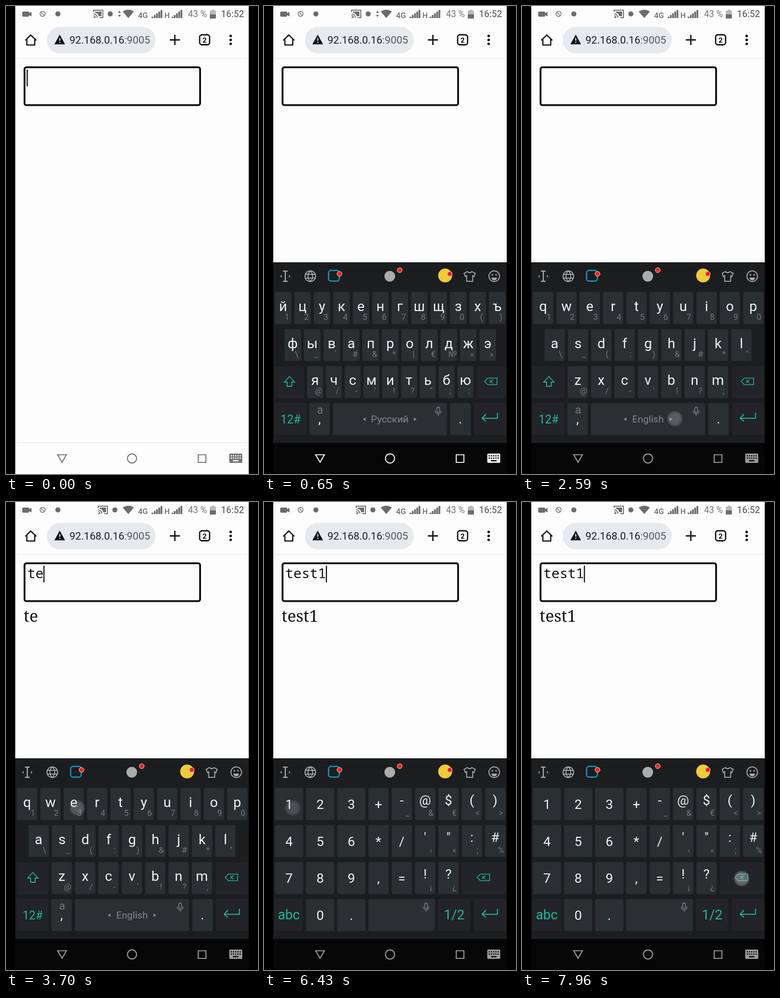
These frames come from a looping animation (544x1008 px, 8000 ms). An HTML page with a canvas:

```html
<!DOCTYPE html>
<html lang="en">
<head>
<meta charset="utf-8">
<title>Typing on a phone</title>
<style>
html, body { margin: 0; width: 100%; height: 100%; overflow: hidden; background: #000; }
canvas { display: block; }
</style>
</head>
<body>
<canvas id="stage" width="544" height="1008"></canvas>
<script>
const g = document.getElementById('stage').getContext('2d');
const LOOP = 8000, TAU = Math.PI * 2;
const SANS = 'Roboto, sans-serif';
const PAGE = '#fdfdfd', INK = '#111112', PILL = '#e6e9ed', STATUS = '#6c6c6c';
const BOARD = '#1c1d1f', KEY = '#2a2f32', SIDE = '#222427', NAV = '#060607';
const TEAL = '#22b79d', PALE = '#f2f2f2', DIM = '#74767a', ICON = '#a9abad', LABEL = '#85888b', RED = '#f02018';

// what the input holds, and when the caret restarts
const TYPED = [[3140, 't'], [3555, 'te'], [4290, 'tes'], [4440, 'test'], [6340, 'test1']];
const CARET = [-60, 3140, 3555, 4290, 4440, 6340, 6470, 7470];
// x, y, press, release, end x
const TOUCHES = [
  [201, 889, 1930, 2470, 330], [253, 657, 3090, 3150], [154, 659, 3510, 3570], [125, 738, 4250, 4300],
  [252, 657, 4390, 4450], [58, 890, 5500, 5580], [62, 659, 6190, 6270], [474, 811, 7800, 7900]
];
const RISE = 40, RISE_TIME = 310, SETTLE = 860, SWIPE = 2130, TO_ENGLISH = 2420, TO_NUMBERS = 5600;
const FADE = 260;

const clamp = v => Math.max(0, Math.min(1, v));
const at = (list, t) => list.filter(e => e <= t).pop();

function text(s, x, y, size, color, align = 'center', font = SANS, weight = 400) {
  g.font = `${weight} ${size}px ${font}`;
  g.textAlign = align;
  g.fillStyle = color;
  g.fillText(s, x, y);
}
function rect(x, y, w, h, color) {
  g.fillStyle = color;
  g.fillRect(x, y, w, h);
}
function paint(fill, stroke, lw) {
  if (fill) { g.fillStyle = fill; g.fill(); }
  if (stroke) { g.strokeStyle = stroke; g.lineWidth = lw; g.stroke(); }
}
function box(x, y, w, h, r, fill, stroke, lw = 2) {
  g.beginPath();
  g.roundRect(x, y, w, h, r);
  paint(fill, stroke, lw);
}
function disc(x, y, r, fill, stroke, lw = 2) {
  g.beginPath();
  g.arc(x, y, r, 0, TAU);
  paint(fill, stroke, lw);
}
// SVG path data placed at x, y
function path(d, x, y, fill, stroke, lw = 2) {
  g.save();
  g.translate(x, y);
  const p = new Path2D(d);
  if (fill) { g.fillStyle = fill; g.fill(p); }
  if (stroke) { g.strokeStyle = stroke; g.lineWidth = lw; g.stroke(p); }
  g.restore();
}

function signal(x) {
  for (let i = 0; i < 5; i++) {
    const h = 3 + i * 3.6;
    rect(x + i * 4.8, 26 - h, 3.8, h, STATUS);
  }
}

function statusBar(t) {
  const early = t < SETTLE, dx = early ? 0 : 10;
  box(35, 12, 15, 11, 2, STATUS);
  path('M0 -2L5 -5V5L0 2Z', 50, 17.5, STATUS);
  disc(79, 17, 5.5, null, STATUS, 1.5);
  path('M-3 -3L3 3', 79, 17, null, STATUS, 1.5);
  disc(112, 17, 5.5, STATUS);
  path('M-10 -4V-8H10V8H3M-10 8H-7M-10 4A4 4 0 0 1 -6 8M-10 0A8 8 0 0 1 -2 8', 199 + dx, 17, null, STATUS, 2);
  path('M-7 -5H7V5H1A10 10 0 0 0 -7 -3Z', 199 + dx, 17, STATUS);
  disc(225 + dx, 17, 5.5, STATUS);
  if (early) path('M-3 -2L0 -7L3 -2ZM-3 2L0 7L3 2Z', 245, 17, STATUS);
  path('M0 9L-12 -5Q0 -13 12 -5Z', 264, 17, STATUS);
  text('4G', 285, 26, 17, STATUS, 'left', SANS, 500);
  signal(314.5);
  text('H', 342, 26, 16, STATUS, 'left', SANS, 500);
  signal(357.5);
  text('43 %', 393, 24, 19.3, '#757575', 'left');
  rect(444, 8, 6, 3, '#b9b9b9');
  rect(440, 10, 13, 8, '#b9b9b9');
  rect(440, 18, 13, 9, STATUS);
  text('16:52', 464, 24, 19.7, STATUS, 'left', SANS, 500);
}

function browserBar() {
  path('M-12 1L0 -10.5L12 1M-8.5 -2V11H8.5V-2', 53.5, 73, null, INK, 2.6);
  box(88, 45, 235, 57, 28.5, PILL);
  path('M0 -11L11.5 10H-11.5Z', 116, 72.5, INK);
  rect(115, 69, 2.2, 6, PILL);
  rect(115, 77, 2.2, 2.4, PILL);
  text('92.168.0.16', 137, 81, 22.4, '#1d1e20', 'left');
  const w = g.measureText('92.168.0.16').width;
  text(':9005', 137 + w, 81, 22.4, '#585a5e', 'left');
  path('M-11 0H11M0 -11V11', 364.5, 73, null, INK, 2.8);
  box(418, 62, 21.5, 21.5, 5, null, INK, 2.8);
  text('2', 428.8, 78.5, 15.5, INK, 'center', SANS, 700);
  for (const y of [64.5, 73, 81.5]) disc(485, y, 2.8, INK);
  rect(20, 112, 504, 1.5, '#ebebeb');
}

function page(t) {
  const entry = TYPED.filter(e => e[0] <= t).pop();
  const value = entry ? entry[1] : '';
  box(40, 132, 379, 81.5, 4, null, INK, 4);
  text(value, 46, 164, 29.35, INK, 'left', '"Noto Sans Mono", monospace');
  const x = value ? 45.5 + g.measureText(value).width : 44.5;
  if ((t - at(CARET, t)) % 1000 < 500) rect(x, 137, 2.4, 36, INK);
  text(value, 38, 258, 35.2, INK, 'left', '"Noto Serif", serif');
}

function toolbar() {
  path('M-5 -11H5M-5 11H5M0 -11V11', 46, 582, null, ICON, 2.4);
  path('M-11 0L-8 -3V3ZM11 0L8 -3V3Z', 46, 582, ICON);
  disc(100, 582, 11.5, null, ICON);
  path('M-11 -4H11M-11 4H11M0 -11C-7 -5 -7 5 0 11C7 5 7 -5 0 -11', 100, 582, null, ICON, 1.8);
  box(139.5, 569.5, 23, 23, 5, null, '#1b86ae', 3);
  disc(271.5, 582, 11.5, ICON);
  disc(391, 580.5, 15, '#f0cb38');
  for (const [x, y] of [[163, 577], [293, 569], [401, 577]]) disc(x, y, 5.2, RED, '#e8c0b8', 1.2);
  path('M-5 -10Q0 -5 5 -10L12 -6L9 1L6.5 -1V11H-6.5V-1L-9 1L-12 -6Z', 444, 582, null, ICON);
  disc(497, 582, 11.5, null, ICON);
  disc(493, 579, 1.8, ICON);
  disc(501, 579, 1.8, ICON);
  path('M-6 3H6A6 6 0 0 1 -6 3Z', 497, 582, ICON);
}

const rowY = r => 616 + r * 79.7;

function key(x, r, w, label, hint, size = 30, dy = 41) {
  box(x, rowY(r), w, 69, 4, KEY);
  if (label) text(label, x + w / 2, rowY(r) + dy, size, PALE);
  if (hint) text(hint, x + w - 9.5, rowY(r) + 60, 18, DIM);
}
function side(x, r, w, label, size = 25) {
  box(x, rowY(r), w, 69, 4, SIDE);
  if (label) text(label, x + w / 2, rowY(r) + 44, size, TEAL);
}
function row(x, r, pitch, w, labels, hints) {
  [...labels].forEach((c, i) => key(x + i * pitch, r, w, c, hints[i]));
}
function shiftKey(w, x) {
  side(23, 2, w);
  path('M0 -11L11 1H5V10H-5V1H-11Z', x, 809, null, TEAL, 1.8);
}
function backspace(x, w, cx) {
  side(x, 2, w);
  path('M-14 0L-7 -7H13V7H-7ZM-3 -3L4 4M4 -4L-3 3', cx, 808.5, null, TEAL, 1.6);
}
function enter() {
  side(453, 3, 69);
  path('M17 -10V2H-16M-8 -7L-16 2L-8 9', 487, 886, null, TEAL, 2);
}
function mic(x) {
  box(x - 3, 864, 6, 12, 3, null, DIM, 1.8);
  path('M-6 -2V0A6 6 0 0 0 6 0V-2M0 6V10', x, 873, null, DIM, 1.6);
}
function spaceLabel(name, x, half) {
  text(name, x, 897, 21, LABEL);
  path('M3 -4L-3 0L3 4Z', x - half, 890, LABEL);
  path('M-3 -4L3 0L-3 4Z', x + half, 890, LABEL);
}

function letterBottom(t) {
  side(23, 3, 69, '12#');
  key(98, 3, 44, ',', '', 28, 44);
  text('a', 121, 878, 24, DIM);
  key(149, 3, 246, '');
  // the label follows the finger until the language flips
  const drag = clamp((t - SWIPE) / (TO_ENGLISH - SWIPE));
  const back = clamp((t - TO_ENGLISH) / 170);
  g.save();
  g.beginPath();
  g.rect(149, 855, 246, 69);
  g.clip();
  if (t < TO_ENGLISH) spaceLabel('Русский', 271.5 + drag * 120, 55);
  else spaceLabel('English', 272 - 90 * (1 - back) ** 2, 49.5);
  g.restore();
  mic(376);
  key(402, 3, 44, '.', '', 28, 44);
  enter();
}

function russian(t) {
  row(23.5, 0, 42, 35.5, 'йцукенгшщзхъ', '1234567890()');
  row(44, 1, 42.1, 36, 'фывапролджэ', '\\_`#&*|€№«»');
  row(93, 2, 40.55, 34.5, 'ячсмитьбю', "@/-'!?\";:");
  shiftKey(63, 55);
  backspace(458, 64, 490);
  letterBottom(t);
}

function english(t) {
  row(23.5, 0, 50.4, 44, 'qwertyuiop', '1234567890');
  row(48.5, 1, 50.4, 44, 'asdfghjkl', '\\_(:)&#*"');
  row(98.5, 2, 50.4, 44, 'zxcvbnm', "@/-'!?;");
  shiftKey(69, 58);
  backspace(453, 69, 487);
  letterBottom(t);
}

function numbers() {
  const rows = ['123+-@$()', '456*/\'":#', '789,=!?'];
  const hints = ['    _&€<>', '     ‹«;%', '     ¡¿'];
  rows.forEach((labels, r) => [...labels].forEach((c, i) => {
    const hint = hints[r][i].trim();
    const x = i < 3 ? 23.5 + i * 67.2 : 225 + (i - 3) * 50.4;
    key(x, r, i < 3 ? 61 : 44, c, hint, 28.5, hint ? 36 : 45);
  }));
  backspace(427, 95, 474);
  side(23, 3, 61, 'abc', 29);
  key(90.7, 3, 61, '0', '', 28.5, 45);
  key(158, 3, 61, '.', '', 28.5, 45);
  key(225, 3, 144, '');
  mic(350);
  side(376, 3, 69, '1/2', 29);
  enter();
}

// the panel rises a short way while it fades in over the page
function keyboard(t) {
  const left = 1 - clamp((t - RISE) / RISE_TIME);
  g.save();
  g.translate(0, 45 * left ** 2);
  rect(20, 552, 504, 389, BOARD);
  rect(20, 941, 504, 67, NAV);
  toolbar();
  if (t < TO_ENGLISH) russian(t);
  else if (t < TO_NUMBERS) english(t);
  else numbers();
  g.globalAlpha = left ** 2.7;
  rect(20, 552, 504, 456, PAGE);
  g.restore();
}

function navIcons(t) {
  const light = t < 120;
  const c = light ? '#757575' : t < SETTLE ? '#f0f0f0' : '#9c9c9c';
  const hole = light ? PAGE : NAV;
  path('M-9.5 -7.5H9.5L0 8.5Z', 121, 974, null, c, 2.2);
  disc(272, 974.5, 9.8, null, c, 2.2);
  box(415, 966.5, 16.5, 16.5, 0, null, c, 2.2);
  box(482, 964, 28, 20, 2, c);
  for (let i = 0; i < 10; i++) rect(485 + (i % 5) * 4.8, 967.5 + (i > 4) * 5, 2.6, 2.6, hole);
  rect(490, 978, 12, 2.6, hole);
}

function touches(t) {
  for (const [x, y, down, up, endX = x] of TOUCHES) {
    if (t < down || t > up + FADE) continue;
    const a = t < up ? 0.85 : 0.5 * (1 - (t - up) / FADE);
    const cx = x + (endX - x) * clamp((t - SWIPE) / (up - SWIPE));
    const glow = g.createRadialGradient(cx, y, 9, cx, y, 18);
    glow.addColorStop(0, `rgba(220,220,220,${a})`);
    glow.addColorStop(0.6, `rgba(196,196,196,${a * 0.85})`);
    glow.addColorStop(1, 'rgba(150,150,150,0)');
    disc(cx, y, 18, glow);
  }
}

function draw(t) {
  rect(0, 0, 544, 1008, '#000');
  g.save();
  g.beginPath();
  g.rect(20, 0, 504, 1008);
  g.clip();
  rect(20, 0, 504, 1008, PAGE);
  statusBar(t);
  browserBar();
  page(t);
  rect(20, 940, 504, 1.5, '#e8e8e8');
  if (t >= RISE) keyboard(t);
  navIcons(t);
  touches(t);
  g.restore();
}

function tick() {
  draw(performance.now() % LOOP);
  requestAnimationFrame(tick);
}
tick();
</script>
</body>
</html>
```
